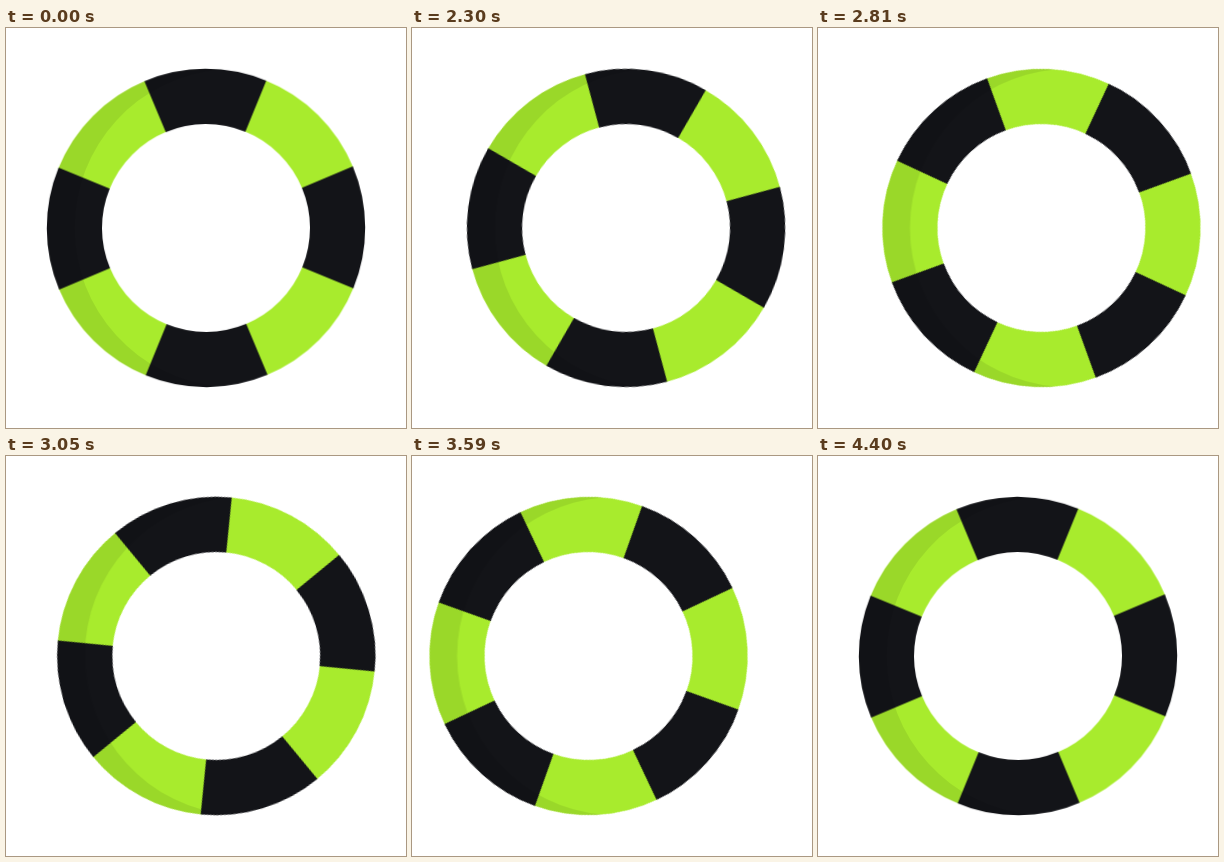
An HTML page that plays this animation: 400x400 px, repeating every 4430 ms.

```html
<!DOCTYPE html>
<html lang="en">
<head>
<meta charset="utf-8">
<title>Rolling ring</title>
<style>
  html, body { margin: 0; width: 100%; height: 100%; overflow: hidden; background: #fff; }
  svg { display: block; width: 100vw; height: 100vh; }

  .ring circle { fill: none; stroke-width: 55.2; }
  .green { stroke: #a8eb2d; stroke-dasharray: 1.02 .98; stroke-dashoffset: -.49; }
  .black { stroke: #131418; stroke-dasharray: 1 1; stroke-dashoffset: .5; }
  .shade { fill: #000; fill-opacity: .08; }

  /* rest 2000 ms, then sway and turn for 2400 ms */
  .sway, .ring {
    animation: 4430ms cubic-bezier(.3333, 0, .6667, 1) infinite;
  }
  .sway { animation-name: sway; }
  .ring { animation-name: turn; }

  @keyframes sway {
    0%, 45.147% { transform: translate(200px, 200px); }
    58.691% { transform: translate(228px, 200px); }
    85.779% { transform: translate(172px, 200px); }
    99.323%, 100% { transform: translate(200px, 200px); }
  }
  @keyframes turn {
    0%, 45.147% { transform: rotate(-.25deg); }
    99.323%, 100% { transform: rotate(179.75deg); }
  }
</style>
</head>
<body>
<svg viewBox="0 0 400 400">
  <g class="sway">
    <g class="ring">
      <circle class="green" r="131.6" pathLength="8"/>
      <circle class="black" r="131.6" pathLength="8"/>
    </g>
    <path class="shade" d="M14 -158.6A159.2 159.2 0 1 0 14 158.6A159.2 159.2 0 0 1 14 -158.6Z"/>
  </g>
</svg>
</body>
</html>
```
